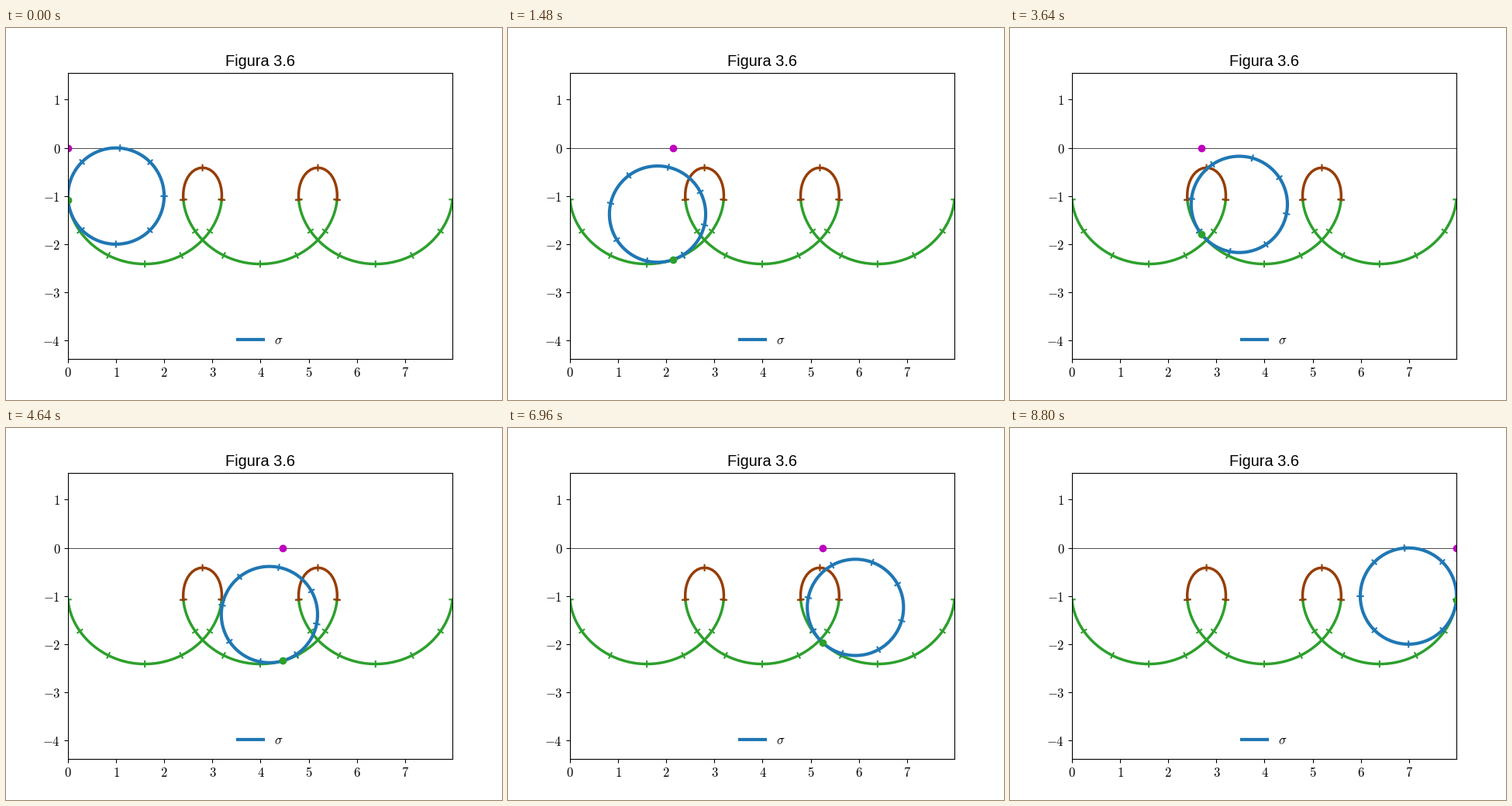
Write a matplotlib script that moves like this. It is 640 px wide and 480 px high and loops after 8.84 s.

```python
import numpy as np
import matplotlib.pyplot as plt
from matplotlib.animation import FuncAnimation

plt.rcParams.update({"font.size": 12, "mathtext.fontset": "cm"})

# Nodary by arc length, in units of pi/40: one period is 80 units.
UNIT = np.pi / 40
PERIOD = 80
FIRST, LAST = -9, 209
FRAMES = 221
TICK = 0.075
BLUE, GREEN, BROWN = "C0", "C2", "#963d05"
ROOT2 = np.sqrt(2)


def radius(j):
    return np.sqrt(3 + 2 * ROOT2 * np.sin(j * UNIT))


def normal(j):
    s = j * UNIT
    return ROOT2 * np.cos(s) / radius(j), (1 + ROOT2 * np.sin(s)) / radius(j)


grid = np.linspace(FIRST, LAST, (LAST - FIRST) * 20 + 1)
speed = normal(grid)[1]
steps = (speed[1:] + speed[:-1]) / 2 * np.diff(grid) * UNIT
grid_x = np.concatenate([[0], np.cumsum(steps)])


def point(j):
    return np.interp(j, grid, grid_x), -radius(j)


def position(frame):
    """Arc position of the contact point, slower where the tangent is upright."""
    turn, k = divmod(frame, PERIOD)
    j = np.interp(k, [0, 2, 58, 60, 63, 77, 80], [-9, -8, 48, 49, 52, 68, 71])
    return j + turn * PERIOD


def cross_ticks(x, y, nx, ny):
    """Short strokes across a curve, joined into one broken line."""
    ends = np.array([-TICK, TICK, np.nan])
    return np.ravel(x[:, None] + np.outer(nx, ends)), \
        np.ravel(y[:, None] + np.outer(ny, ends))


fig, ax = plt.subplots(figsize=(6.4, 4.8), dpi=100)
width = grid_x[-1]
half = width * 369.6 / 496 / 2
ax.set_xlim(0, width)
ax.set_ylim(-ROOT2 - half, -ROOT2 + half)
ax.set_xticks(range(8), [f"${v}$" for v in range(8)])
ax.set_yticks(range(-4, 2), [f"${v}$" for v in range(-4, 2)])
ax.tick_params(axis="x", pad=2.8)
ax.set_title("Figura 3.6", fontname="Liberation Sans", fontsize=14.4)
ax.axhline(0, color="k", lw=0.5)

tick_style = dict(lw=1.5, solid_capstyle="butt")


def arc(start, stop, marks, color):
    ax.plot(*point(np.arange(start, stop + 1)), color=color, lw=2.5)
    marks = np.array(marks)
    ax.plot(*cross_ticks(*point(marks), *normal(marks)), color=color, **tick_style)


for turn in range(3):
    o = turn * PERIOD
    arc(o - 9, o + 49, [o + m for m in (-9, 0, 10, 20, 30, 40, 49)], GREEN)
for turn in range(2):
    o = turn * PERIOD
    arc(o + 49, o + 71, [o + m for m in (49, 60, 71)], BROWN)

rim = np.arange(-9, 72)
rim_marks = np.array([-9, 0, 10, 20, 30, 40, 49, 60])
circle, = ax.plot([], [], color=BLUE, lw=3)
spokes, = ax.plot([], [], color=BLUE, **tick_style)
foot, = ax.plot([], [], "mo")
contact, = ax.plot([], [], "o", color=GREEN)
key, = ax.plot([], [], color=BLUE, lw=3, label=r"$\sigma$")
ax.legend(handles=[key], loc="lower center", frameon=False)


def update(frame):
    j = position(frame)
    x, y = point(j)
    nx, ny = normal(j)
    cx, cy = x + nx, y + ny

    # Rolling without slipping: rim arcs match arcs on the curve.
    def directions(marks):
        angle = np.arctan2(-ny, -nx) + (marks - j) * UNIT
        return np.cos(angle), np.sin(angle)

    ux, uy = directions(rim)
    circle.set_data(cx + ux, cy + uy)
    ux, uy = directions(rim_marks)
    spokes.set_data(*cross_ticks(cx + ux, cy + uy, ux, uy))
    foot.set_data([x], [0])
    contact.set_data([x], [y])
    return circle, spokes, foot, contact


anim = FuncAnimation(fig, update, frames=FRAMES, interval=40,
                     repeat=True, repeat_delay=0, blit=False)
plt.show()
```
